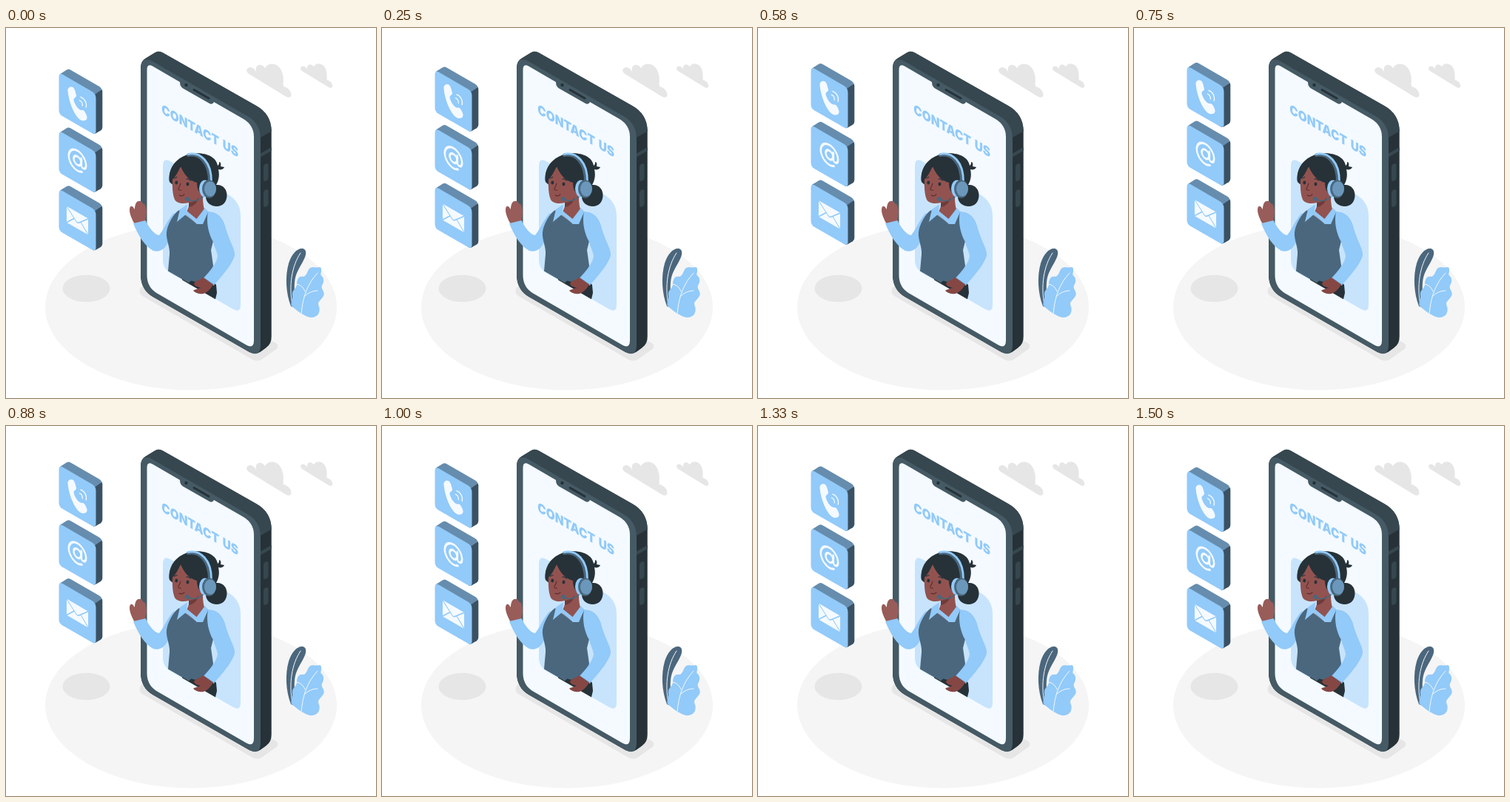
Write an HTML page that moves like this. It is 500 by 500 pixels and loops after 1540 ms.

```html
<!DOCTYPE html>
<html lang="en">
<head>
<meta charset="utf-8">
<title>Contact us</title>
<style>
html, body { margin: 0; width: 100%; height: 100%; overflow: hidden; background: #fff; }
svg { display: block; width: 100vw; height: 100vh; }
.sky { fill: #92caf9; }
.slate { fill: #4b677d; }
.ink { fill: #263238; }
.skin { fill: #925350; }
.grey { fill: #e6e6e6; }
.line { fill: none; stroke-linecap: round; stroke-linejoin: round; }
</style>
</head>
<body>
<svg viewBox="0 0 500 500">
  <defs>
    <path id="cloud" d="M327 54C331 51 336 55 338.500 60C335 50 344 46 350 54C355 45 372 46 374.500 66C375.500 72 374 75 375 79C380 80 385.500 85 385.500 90C385.500 94 382 95 378 92.500L329 62.500C325 60 324 56 327 54Z"/>
    <g id="tile">
      <path fill="#3a5164" d="M119 89L129.500 83Q130.300 84.500 130.300 86V134Q130.300 137 128 138.500L121 142.500Q119 143.500 117 142.300Z"/>
      <path fill="#668dae" d="M73 62.200L82 56.500Q84.500 55 87 56.500L126 79Q128.500 80.500 129.500 83L120.500 89.500L100 81Z"/>
      <path class="sky" d="M71.500 66.500Q71.500 60 77 63L116.500 86Q121.500 89 121.500 95V139Q121.500 145 116 142L76 119Q71.500 116 71.500 111Z"/>
    </g>
  </defs>

  <ellipse cx="250" cy="377.200" rx="197" ry="112.300" fill="#f5f5f5"/>
  <ellipse class="grey" cx="108.500" cy="352" rx="32" ry="18.300"/>
  <use href="#cloud" class="grey"/>
  <use href="#cloud" class="grey" transform="translate(164.500 13.500) scale(.718)"/>

  <g id="leaves">
    <path class="slate" d="M385 376C378 358 377 335 382 318C386 305 394 297 401 298C407 299 406 307 402 314C397 324 391 331 390 344C389 356 391 368 393 379Z"/>
    <path class="line" stroke="#f5f9fe" d="M387 374C382 348 386 322 398 304"/>
    <path class="sky" d="M399 386C394 382 389 379 385.500 375C385 369 388 365 387 361C386 354 392 353 393 347C393 340 395 335 402 336C406 335 407 329 410 325C414 321 419 325 424 323C428 324 425 331 425.500 334C431 338 429.500 344 427 348C425 353 431 355 429.500 361C427 367 420 370 422.500 375C425 381 424 389 415 391C408 392 404 388 399 386Z"/>
    <path class="line" stroke="#f5f9fe" d="M399 386C401 364 407 346 421 331M392 346C399 347 402 351 404 356M403 363C408 358 414 355 421 355"/>
  </g>

  <g id="phone">
    <path class="grey" d="M180.500 355Q182 347 191 349L345 420L362 424Q371 429 365 434L347 447Q340 452 333 448L184 362Q180 359 180.500 355Z"/>
    <path class="ink" d="M182 55Q182 45 188 41.500L201 33.500Q206 30 212 33.500L338 105Q358 116 358.700 138V417Q359 427 351 432.500L344 437.500Q338 442 329 438L199 363.500Q182 354 182 333Z"/>
    <path fill="#37474f" d="M183 50Q184 44 188 41.500L201 33.500Q206 30 212 33.500L338 105Q358 116 358.700 139.500L344 148L320 125L196 52Z"/>
    <path fill="#455a64" d="M182 55Q182 39 196 44L326 119Q344 129 344 150V429Q344 445 329 438L199 363.500Q182 354 182 333Z"/>
    <path fill="#37474f" d="M344 169.500L358.700 161V166L344 174.500ZM348 188Q348 185 351 183.500Q354.500 182 354.500 186V202Q354.500 205 351.500 206.500Q348 208 348 204ZM348 223Q348 220 351 218.500Q354.500 217 354.500 221V237Q354.500 240 351.500 241.500Q348 243 348 239Z"/>
    <path fill="#f4faff" d="M190.500 56.500Q190.500 47.500 198 51.500L235 73Q235 79 239 81.500L275 102Q279 104 281 100L321 123Q335 131.500 335 147V422Q335 434 325 428.500L205 359Q190.500 351 190.500 334Z"/>
    <path class="line" stroke="#263238" stroke-width="2.800" d="M254 83.500L274 95"/>
    <circle class="ink" cx="243.500" cy="77" r="2.200"/>
    <path fill="#c8e4fc" d="M212 187Q212 174.500 222 180L300 225Q317 235 317 254V374Q317 385.500 307 380L222 331Q212 325 212 314Z"/>
    <text class="sky" transform="matrix(.866 .5 0 1 210.300 115.300)" font-family="Inter, Roboto, sans-serif" font-weight="900" font-size="17.700" word-spacing="2">CONTACT US</text>
  </g>

  <g id="agent">
    <path class="ink" d="M238 335L277 340L284 347L285 358L283 366.500L238 340.500Z"/>
    <path class="ink" d="M221 208C218.500 190 229 176 246 171C264 166 284 172 286 186C288 185 288 183 288 181C290 181 291 184 290 187L295 188C294 191 290 192 287 191C289 200 287 207 284 212C293 211 299 218 298.500 227C298 236 292 241 285 241C276 241 270 235 270 228L262 228C250 222 226 215 221 208Z"/>
    <path class="skin" d="M225.500 200C224 212 225 225 228 232C231 237 239 238 247 236V241L243 252L257 266L269 248C267 243 266 236 266 229L263 204L237 187L230 193Z"/>
    <path fill="#6f3b39" d="M247 236C254 235 258 232 260 229C259 236 254 241 247 242Z"/>
    <path class="ink" d="M221 208C219 195 226 183 236 179L252 175L269 182L270 225C262 226 258 219 258 209C248 206 241 199 236 187C233 193 230 200 225.500 204Z"/>
    <ellipse class="ink" cx="230.300" cy="209" rx="2" ry="2.400"/>
    <ellipse class="ink" cx="245.500" cy="211" rx="2" ry="2.400"/>
    <path class="line" stroke="#263238" stroke-width="1.200" d="M227 203L231 201.500M244 204C246 203.500 248 204.500 249.500 206"/>
    <path class="line" stroke="#602f2f" stroke-width="1.200" d="M236 210C235 214 232 217 233 218.500L236.500 219.500M234 226C236.500 227.500 239 227 241 225"/>

    <path fill="#985c59" d="M174 265C169 257 165 246 168 241.500C170.500 239 172.500 243 174 245C174 239 176 234 179 234C183 233 184 235 185 237.500C188 237 189 241 189.500 245C190.500 252 189 258 187 264Z"/>
    <path class="sky" d="M172 264L188.500 260C192 267 199 279 207 280C214 271 219 258 226 251L237 247L235 270L220 287C216 298 208 304 199 301C187 295 178 279 172 264Z"/>
    <path class="slate" d="M234 246C226 251 218 266 217 276C216 286 222 296 221 306L219 328.500L247 344.500L250 341.500C258 344 267 345 275 343L280 321L277 300L280 288V260L271 246L258 265Z"/>
    <path class="sky" d="M245.500 238L235 245L231 262L243 252L258 265L266 265L273 249L269 243L257.500 258L244 247Z"/>
    <path class="sky" d="M273 248C288 249 294 257 298 274C302 288 310 299 309 308C304 322 291 336 280.500 348L267 338C275 329 285 318 286 308C285 301 281 295 280 289C274 279 270 263 273 248Z"/>
    <path class="line" stroke="#73aedf" d="M267.500 337.500L281 347"/>
    <path fill="#854744" d="M266.500 337L280 346.500C277 352 273 357 267 359C262 360 255 358 253 354.500L263 351C258 350 254 348 254 345C259 340 263 340 266.500 337Z"/>

    <path class="line" stroke="#4b677d" stroke-width="4" d="M246 172C262 169 275 182 275 208"/>
    <path class="line" stroke="#92caf9" stroke-width="2.800" d="M246 170.500C263 167 278 181 277.500 208"/>
    <path class="line" stroke="#4b677d" stroke-width="1.600" d="M245 231C254 237 264 231 269 225"/>
    <ellipse class="slate" cx="245" cy="231" rx="3.300" ry="2.800"/>
    <ellipse class="sky" cx="269" cy="217" rx="8" ry="11.500"/>
    <ellipse class="slate" cx="274.500" cy="217.500" rx="9.500" ry="12.200"/>
    <ellipse cx="276" cy="217.500" rx="8" ry="10.300" fill="#6b97bb"/>
  </g>

  <g id="tiles">
    <use href="#tile" y="157.400"/>
    <use href="#tile" y="78.700"/>
    <use href="#tile"/>
    <g fill="#f5faff">
      <path d="M83.500 85C83 80 88 78.500 90.500 80C93 82 94 87 95 91C95.500 94 91 94 91.500 97.500C93 103 96 108 100 110.500C102.500 112 104 110 106 112.500C108 116 110 119 109.500 122C109 125.500 103 126.500 99.500 123.500C92 117 85 101 83.500 85Z"/>
      <path class="line" stroke="#f5faff" stroke-width="1.300" d="M99.300 98C101.800 98.500 103.800 102 103.300 105M100.800 93.300C105.800 94.800 109.600 100.600 108.200 107.200"/>
    </g>
    <g transform="matrix(.866 .5 0 1 96.500 179.300)" class="line" stroke="#f5faff" stroke-width="3">
      <circle r="5.800"/>
      <path d="M6.200 -6.200V3C6.200 8 13.500 7 13.500 -1A13.500 13.500 0 1 0 7 11.500"/>
    </g>
    <g transform="matrix(.866 .5 0 1 96.500 260.200)">
      <rect x="-16.800" y="-11" width="33.600" height="22" rx="1" fill="#f5faff"/>
      <path class="line" stroke="#92caf9" stroke-width="1.400" d="M-16.500 -10.500L-2 2Q0 3.500 2 2L16.500 -10.500M-16.500 10.500L-5 -.5M16.500 10.500L5 -.5"/>
    </g>
  </g>
</svg>
<script>
const LOOP = 1540, PERIOD = 1500, LEAD = 40, RISE = 10;
const tiles = document.getElementById("tiles");

// Linear rise and fall; the loop begins shortly after the lowest point.
function lift(ms) {
  const phase = ((ms % LOOP + LEAD) % PERIOD) / PERIOD;
  return RISE * (1 - Math.abs(1 - 2 * phase));
}

const rest = lift(0);
const start = performance.now();

function draw(now) {
  const y = rest - lift(Math.max(0, now - start));
  tiles.setAttribute("transform", `translate(0 ${y.toFixed(3)})`);
  requestAnimationFrame(draw);
}
draw(start);
</script>
</body>
</html>
```
